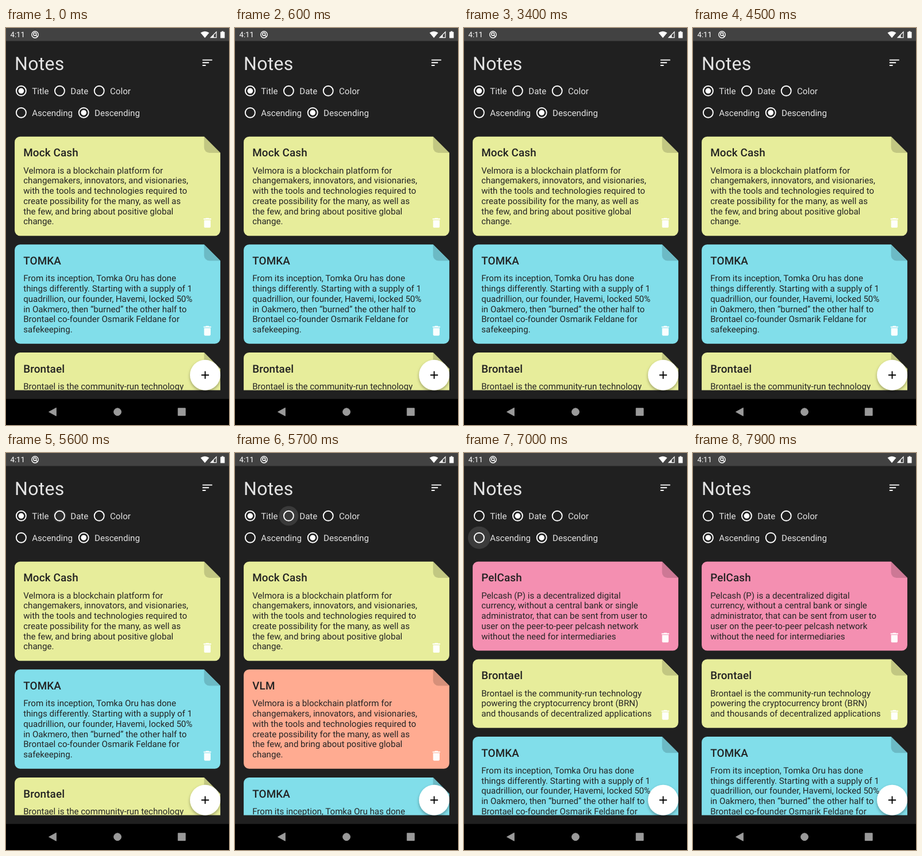
Animation of 388 by 690 pixels, one loop 8000 ms. Source, as an HTML page:

```html
<!DOCTYPE html>
<html lang="en">
<head>
<meta charset="utf-8">
<title>Notes</title>
<style>
html, body { margin: 0; width: 100%; height: 100%; overflow: hidden; background: #202020; }
svg { display: block; width: 100vw; height: 100vh; font-family: Roboto, sans-serif; text-rendering: geometricPrecision; }
.label { font-size: 15.09px; fill: #e3e3e3; }
.title { font-size: 18.86px; font-weight: 500; letter-spacing: .14px; fill: #222; }
.body { font-size: 15.09px; fill: #242424; }
.ring { fill: none; stroke: #fff; stroke-width: 1.9; }
.dot { fill: #fff; }
.ripple { fill: #fff; opacity: 0; }

/* One 8 s loop: sort by date at 5.7 s, ascending at 7 s */
.list, .dot, .ripple { animation: 8s linear infinite; }
.list { animation-timing-function: step-end; }
#byTitle { animation-name: byTitle; }
#newest { animation-name: newest; }
#oldest { animation-name: oldest; }
#dotTitle { animation-name: dateOff; }
#dotDate { animation-name: dateOn; }
#dotDescending { animation-name: ascOff; }
#dotAscending { animation-name: ascOn; }
#rippleDate { animation-name: pressDate; }
#rippleAscending { animation-name: pressAsc; }

@keyframes byTitle { 0% { visibility: visible } 71.25%, 100% { visibility: hidden } }
@keyframes newest { 0% { visibility: hidden } 71.25% { visibility: visible } 87.5%, 100% { visibility: hidden } }
@keyframes oldest { 0% { visibility: hidden } 87.5%, 100% { visibility: visible } }
@keyframes dateOff { 0%, 71.25% { r: 4.8px } 72.5%, 100% { r: 0px } }
@keyframes dateOn { 0%, 71.25% { r: 0px } 72.5%, 100% { r: 4.8px } }
@keyframes ascOff { 0%, 87.5% { r: 4.8px } 88.75%, 100% { r: 0px } }
@keyframes ascOn { 0%, 87.5% { r: 0px } 88.75%, 100% { r: 4.8px } }
@keyframes pressDate {
  0%, 69% { r: 6.8px; opacity: 0 }
  70% { r: 11.5px; opacity: .07 }
  71.25% { r: 17px; opacity: .12 }
  72.5% { r: 20.5px; opacity: .12 }
  74.4%, 100% { r: 21px; opacity: 0 }
}
@keyframes pressAsc {
  0%, 85% { r: 6.8px; opacity: 0 }
  86.25% { r: 14px; opacity: .11 }
  87.5% { r: 19.5px; opacity: .12 }
  88.75% { r: 22px; opacity: .12 }
  90.6%, 100% { r: 22.5px; opacity: 0 }
}
</style>
</head>
<body>
<svg id="stage" viewBox="0 0 388 690" xmlns="http://www.w3.org/2000/svg">
  <defs>
    <clipPath id="listArea"><rect y="180" width="388" height="449.6"/></clipPath>
    <filter id="shadow" x="-40%" y="-40%" width="180%" height="180%">
      <feDropShadow dx="0" dy="2.5" stdDeviation="2.5" flood-color="#000" flood-opacity=".35"/>
    </filter>
    <path id="trash" fill="#fff" fill-opacity=".96" d="M6 19c0 1.1.9 2 2 2h8c1.1 0 2-.9 2-2V7H6v12zM19 4h-3.5l-1-1h-5l-1 1H5v2h14V4z"/>
  </defs>
  <rect width="388" height="690" fill="#202020"/>

  <g id="statusBar" fill="#fff">
    <rect width="388" height="22.6" fill="#424242"/>
    <text x="7.5" y="16.3" font-size="13.2">4:11</text>
    <g fill="none" stroke="#fff" stroke-width="1.4">
      <circle cx="50.5" cy="11.5" r="5.7"/>
      <circle cx="50.3" cy="10.8" r="2.5"/>
      <path d="M52 12.6l3 3"/>
    </g>
    <path d="M338.5 8.3Q346 3.2 353.5 8.3L346 17.3z"/>
    <path d="M366 6.8v9.8h-9.8z" fill="none" stroke="#fff" stroke-width="1.2"/>
    <path d="M361.5 11.3v5.3h-5.3z"/>
    <path d="M375.3 5.4h3v1.3h2.2v10.8h-7.4V6.7h2.2z"/>
  </g>

  <text x="15.1" y="73.3" font-size="32.06" letter-spacing=".236" fill="#e3e3e3">Notes</text>
  <path transform="translate(339 49) scale(.943)" fill="#fff" d="M3 18h6v-2H3v2zM3 6v2h18V6H3zm0 7h12v-2H3v2z"/>

  <g id="radios"></g>
  <g id="lists" clip-path="url(#listArea)"></g>

  <circle cx="346.5" cy="603.2" r="26.4" fill="#fff" filter="url(#shadow)"/>
  <path transform="translate(335.2 591.9) scale(.943)" d="M19 13h-6v6h-2v-6H5v-2h6V5h2v6h6v2z"/>

  <rect y="644.7" width="388" height="45.3"/>
  <g fill="#9a9a9a" stroke="#9a9a9a" stroke-linejoin="round">
    <path d="M87.3 660.2v14L74.6 667.2z"/>
    <circle cx="194" cy="667.2" r="6.4"/>
    <rect x="299.3" y="660.8" width="12.8" height="12.8"/>
  </g>
</svg>
<script>
const LEFT = 15.1, TOP = 188.7, WIDTH = 357.8, GAP = 15.1, CUT = 28.3, RADIUS = 9.43, LINE = 17.75;
const GREEN = [231, 237, 155], ORANGE = [255, 171, 145], BLUE = [129, 222, 234], PINK = [244, 143, 177];

const platform = ["Velmora is a blockchain platform for", "changemakers, innovators, and visionaries,",
  "with the tools and technologies required to", "create possibility for the many, as well as",
  "the few, and bring about positive global", "change."];
const mock = { title: "Mock Cash", color: GREEN, lines: platform };
const velmora = { title: "VLM", color: ORANGE, lines: platform };
const tomka = { title: "TOMKA", color: BLUE, lines: [
  "From its inception, Tomka Oru has done", "things differently. Starting with a supply of 1",
  "quadrillion, our founder, Havemi, locked 50%", "in Oakmero, then “burned” the other half to",
  "Brontael co-founder Osmarik Feldane for", "safekeeping."] };
const brontael = { title: "Brontael", color: GREEN, lines: [
  "Brontael is the community-run technology", "powering the cryptocurrency bront (BRN)",
  "and thousands of decentralized applications"] };
const pelcash = { title: "PelCash", color: PINK, lines: [
  "Pelcash (P) is a decentralized digital", "currency, without a central bank or single",
  "administrator, that can be sent from user to", "user on the peer-to-peer pelcash network",
  "without the need for intermediaries"] };

const rgb = (color, shade = 1) => `rgb(${color.map(c => Math.round(c * shade))})`;
const text = (cls, x, y, s) => `<text class="${cls}" x="${x}" y="${y}">${s}</text>`;
const cardHeight = note => 66 + LINE * note.lines.length;

function card(note, top) {
  const h = cardHeight(note), r = RADIUS, fold = WIDTH - CUT;
  return `<g transform="translate(${LEFT} ${top})">
    <path fill="${rgb(note.color)}" d="M${r} 0H${fold}L${WIDTH} ${CUT}V${h - r}a${r} ${r} 0 0 1 ${-r} ${r}H${r}a${r} ${r} 0 0 1 ${-r} ${-r}V${r}a${r} ${r} 0 0 1 ${r} ${-r}z"/>
    <path fill="${rgb(note.color, .84)}" d="M${fold} 0V${CUT - r}a${r} ${r} 0 0 0 ${r} ${r}H${WIDTH}z"/>
    ${text("title", 15.1, 34.8, note.title)}
    ${note.lines.map((s, i) => text("body", 15.1, 64 + LINE * i, s)).join("")}
    <use href="#trash" transform="translate(${WIDTH - 33.9} ${h - 33.9}) scale(.943)"/>
  </g>`;
}

function list(id, notes) {
  let top = TOP;
  const cards = notes.map(note => {
    const markup = card(note, top);
    top += cardHeight(note) + GAP;
    return markup;
  });
  return `<g class="list" id="${id}">${cards.join("")}</g>`;
}

const radio = (name, x, y) => `
  <circle class="ripple" id="ripple${name}" cx="${x}" cy="${y}" r="0"/>
  <circle class="ring" cx="${x}" cy="${y}" r="8.5"/>
  <circle class="dot" id="dot${name}" cx="${x}" cy="${y}" r="0"/>
  ${text("label", x + 18.86, y + 5.8, name)}`;

document.getElementById("radios").innerHTML =
  radio("Title", 26.4, 109.3) + radio("Date", 93.4, 109.3) + radio("Color", 162.2, 109.3) +
  radio("Ascending", 26.4, 147.2) + radio("Descending", 135.2, 147.2);
document.getElementById("lists").innerHTML =
  list("byTitle", [mock, tomka, brontael]) +
  list("newest", [mock, velmora, tomka]) +
  list("oldest", [pelcash, brontael, tomka]);
</script>
</body>
</html>
```
